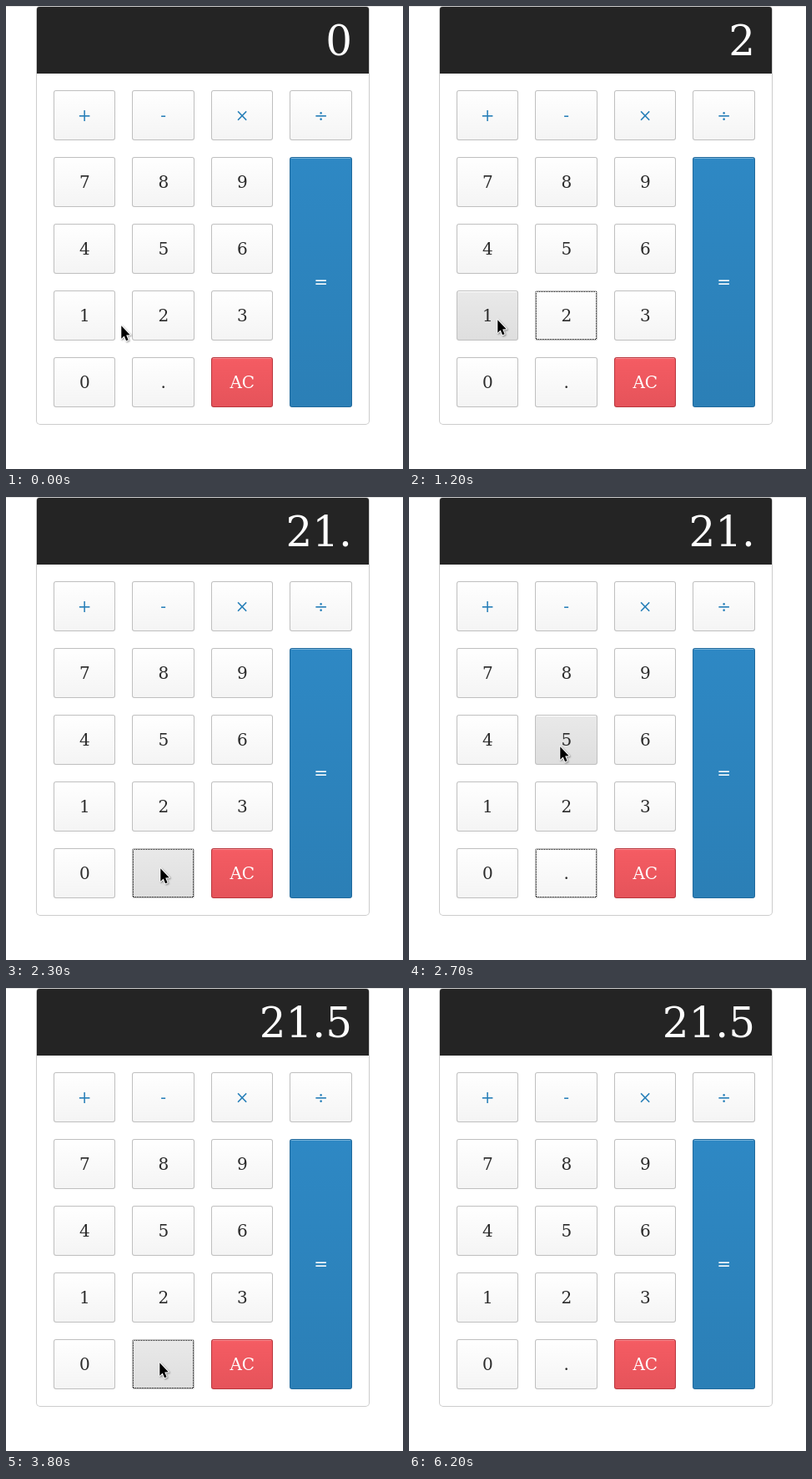
An HTML page with a canvas that plays this animation: 476 px wide and 555 px high, repeating every 6300 ms.

```html
<!DOCTYPE html>
<html lang="en">
<head>
<meta charset="utf-8">
<title>Calculator</title>
<style>
  html, body { margin: 0; width: 100%; height: 100%; overflow: hidden; background: #fff; }
  canvas { display: block; }
</style>
</head>
<body>
<canvas id="stage" width="476" height="555"></canvas>
<script>
const ctx = document.getElementById('stage').getContext('2d');
const LOOP = 6300;
const FONT = '"DejaVu Serif", serif';

const SKINS = {
  plain: { top: '#ffffff', bottom: '#f4f4f4', edge: '#bfbfbf', ink: '#2b2b2b', shine: '#fff' },
  hover: { top: '#e9e9e9', bottom: '#dedede', edge: '#bfbfbf', ink: '#2b2b2b', shine: '#fff' },
  blue: { top: '#2e88c4', bottom: '#2b7fb6', edge: '#20699c', ink: '#fff', shine: 'rgba(255,255,255,.35)' },
  red: { top: '#f55c63', bottom: '#e5535a', edge: '#b8363d', ink: '#fff', shine: 'rgba(255,255,255,.3)' }
};

const COLS = [[57, 74], [151, 75], [246, 74], [340, 75]];
const ROWS = ['+-×÷', '789=', '456', '123', '0.C'];
const keys = [];
ROWS.forEach((row, r) => [...row].forEach((id, c) => {
  keys.push({
    id,
    label: id === 'C' ? 'AC' : id,
    x: COLS[c][0], w: COLS[c][1],
    y: 101 + 80 * r, h: id === '=' ? 300 : 60,
    mid: 57 + 94.5 * c + 37.25,
    skin: id === '=' ? 'blue' : id === 'C' ? 'red' : 'plain',
    ink: r === 0 ? '#2980b9' : null
  });
}));

// Pointer samples: time, x, y, hovered key. A missing position hides it.
const POINTER = [
  [0, 138, 383, ''], [100, 145, 382, ''], [200, 154, 380, '2'],
  [300, 163, 379, '2'], [400, 171, 378, '2'], [500, 176, 377, '2'],
  [600, 178, 376, '2'], [900, 155, 375, '2'], [1000, 134, 375, ''],
  [1100, 116, 375, '1'], [1200, 106, 376, '1'], [1300, 102, 376, '1'],
  [1600, 133, 399, ''], [1700, 166, 423, ''], [1800, 179, 437, '.'],
  [1900, 184, 443, '.'], [2000, 185, 445, '.'], [2700, 181, 299, '5'],
  [2800, 182, 296, '5'], [2900, 183, 294, '5'], [3300, 179, 355, '5'],
  [3400, 175, 402, '2'], [3500, 177, 431, '.'], [3600, 181, 444, '.'],
  [3700, 184, 449, '.'], [5300, 185, 385, '.'], [5400, 104, 108, '7'],
  [5500, null, null, '']
];
const FOCUS = [[0, ''], [600, '2'], [1300, '1'], [2000, '.'], [3100, '5'], [3800, '.'], [6200, '']];
const DISPLAY = [[0, '0'], [800, '2'], [1500, '21'], [2300, '21.'], [3200, '21.5']];

const ARROW = [[0, 0], [0, 15.5], [3.4, 12.3], [5.8, 18], [8.3, 17], [5.9, 11.3], [10.4, 11]];

// Latest entry that has started by time t.
const at = (list, t) => list.filter(e => e[0] <= t).pop();

function text(str, x, y, size, color, align) {
  ctx.font = size + 'px ' + FONT;
  ctx.textAlign = align;
  ctx.fillStyle = color;
  ctx.fillText(str, x, y);
}

function box(x, y, w, h, radius, color) {
  ctx.beginPath();
  ctx.roundRect(x, y, w, h, radius);
  ctx.fillStyle = color;
  ctx.fill();
}

function drawKey(key, hovered, focused) {
  const { x, y, w, h } = key;
  const skin = SKINS[hovered ? 'hover' : key.skin];
  const fill = ctx.createLinearGradient(0, y, 0, y + h);
  fill.addColorStop(0, skin.top);
  fill.addColorStop(1, skin.bottom);
  box(x, y, w, h, 3, skin.edge);
  box(x + 1, y + 1, w - 2, h - 2, 2, fill);
  ctx.fillStyle = skin.shine;
  ctx.fillRect(x + 2, y + 1, w - 4, 1);
  if (focused) {
    ctx.save();
    ctx.setLineDash([1, 1]);
    ctx.lineDashOffset = 0.5;
    ctx.strokeStyle = '#000';
    ctx.lineWidth = 1;
    ctx.strokeRect(x + 1.5, y + 1.5, w - 3, h - 3);
    ctx.restore();
  }
  text(key.label, key.mid, y + h / 2 + 7, 20, key.ink || skin.ink, 'center');
}

function drawPointer(x, y) {
  ctx.save();
  ctx.translate(x + 0.3, y + 0.3);
  ctx.beginPath();
  ARROW.forEach(p => ctx.lineTo(p[0], p[1]));
  ctx.closePath();
  ctx.lineJoin = 'round';
  ctx.lineWidth = 2;
  ctx.strokeStyle = '#fff';
  ctx.shadowColor = 'rgba(0,0,0,.4)';
  ctx.shadowBlur = 2;
  ctx.shadowOffsetX = ctx.shadowOffsetY = 1;
  ctx.stroke();
  ctx.shadowColor = 'transparent';
  ctx.fillStyle = '#000';
  ctx.fill();
  ctx.restore();
}

function draw(t) {
  const [, px, py, hovered] = at(POINTER, t);
  const focused = at(FOCUS, t)[1];
  ctx.fillStyle = '#fff';
  ctx.fillRect(0, 0, 476, 555);
  ctx.fillStyle = '#e5e5e5';
  ctx.fillRect(0, 0, 476, 1);
  box(36, 0, 400, 502, 5, '#cccccc');
  box(37, 1, 398, 500, 4, '#fff');
  box(37, 1, 398, 80, [3, 3, 0, 0], '#242424');
  text(at(DISPLAY, t)[1], 415, 59, 50, '#fff', 'right');
  keys.forEach(k => drawKey(k, k.id === hovered, k.id === focused));
  if (px !== null) drawPointer(px, py);
}

const start = performance.now();
function tick() {
  draw((performance.now() - start) % LOOP);
  requestAnimationFrame(tick);
}
tick();
</script>
</body>
</html>
```
